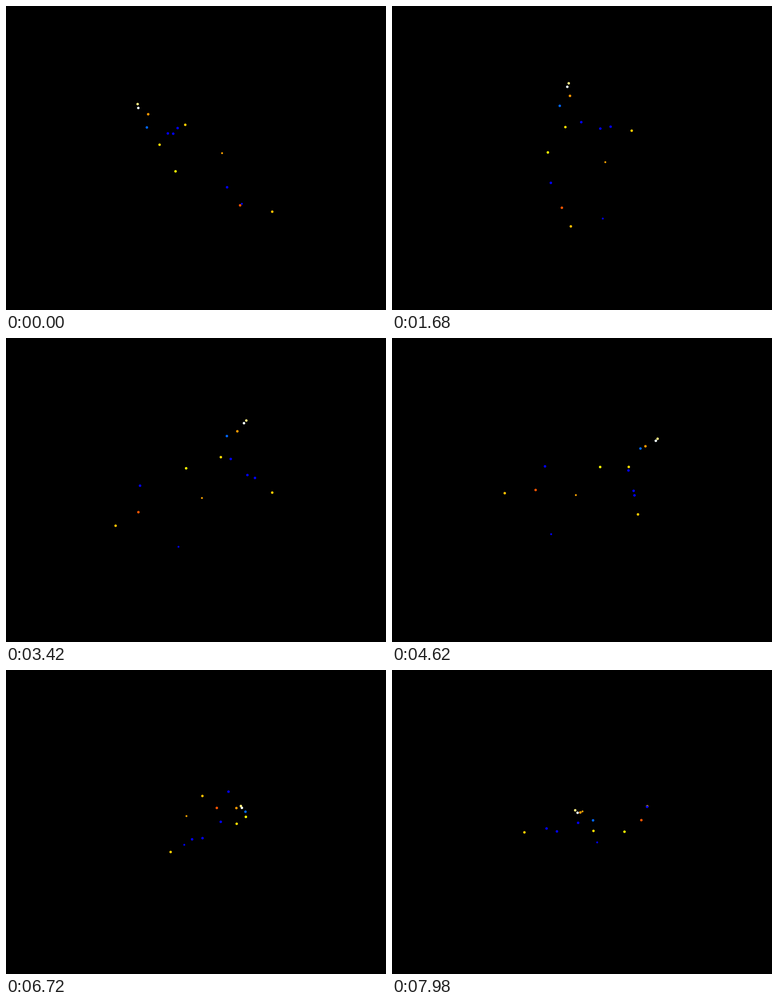
A matplotlib script that plays this animation: 837x669 px, repeating every 8000 ms.

```python
import numpy as np
import matplotlib.pyplot as plt
from matplotlib.animation import FuncAnimation

W, H, DPI = 837, 669, 64
CX, CY = 435.7, 331          # screen position of the rotation axis
DEPTH = 2500                 # camera distance in pixels
ELEV = np.radians(30)
BIG, SMALL = 5.6, 4.2        # dot diameters in pixels
BLUE = "#0000ff"

# x, depth, projected height, colour, diameter
STARS = [
    (-144.6, -40.0, 94.2, "#fff080", BIG),
    (-143.1, -35.1, 88.2, "#f2ffff", BIG),
    (-121.5, -28.1, 78.0, "#ff9900", BIG),
    (-123.7, -1.9, 61.9, "#0066ff", BIG),
    (-96.8, 1.0, 26.05, "#ffdd00", BIG),
    (-60.7, 70.8, 3.4, "#ffff00", BIG),
    (-79.4, -30.4, 35.5, BLUE, BIG),
    (-68.9, -75.3, 13.5, BLUE, BIG),
    (-59.4, -97.1, 15.7, BLUE, BIG),
    (-42.9, -144.7, 0.65, "#ffcc00", BIG),
    (40.4, -13.55, 0.4, "#ffa500", SMALL),
    (48.9, 132.4, 1.4, BLUE, BIG),
    (77.3, 123.7, -42.25, "#ff5500", BIG),
    (85.0, 23.1, -94.1, BLUE, SMALL),
    (144.7, 145.0, -44.3, "#ffbf00", BIG),
]
px, py, pz = np.array([s[:3] for s in STARS]).T
pz = pz / np.cos(ELEV)
colors = np.array([s[3] for s in STARS])
sizes = (np.array([s[4] for s in STARS]) * 72 / DPI) ** 2


def project(deg):
    """Screen positions and depths after turning the stars by deg."""
    a = np.radians(deg)
    u = px * np.cos(a) - py * np.sin(a)
    h = px * np.sin(a) + py * np.cos(a)
    d = h * np.cos(ELEV) + pz * np.sin(ELEV)
    v = pz * np.cos(ELEV) - h * np.sin(ELEV)
    scale = 1 / (1 - d / DEPTH)
    return np.column_stack([CX + u * scale, CY - v * scale]), d


fig = plt.figure(figsize=(W / DPI, H / DPI), dpi=DPI, facecolor="black")
ax = fig.add_axes([0, 0, 1, 1])
ax.set_xlim(0, W)
ax.set_ylim(H, 0)
ax.axis("off")
dots = ax.scatter(px, py, s=sizes, c=colors, linewidths=0)


def update(i):
    # one degree per 30 ms step, shown on a 20 ms clock
    pos, depth = project((2 * i + 1) // 3)
    order = np.argsort(depth)
    dots.set_offsets(pos[order])
    dots.set_facecolors(colors[order])
    dots.set_sizes(sizes[order], dpi=DPI)
    return dots,


anim = FuncAnimation(fig, update, frames=400, interval=20, repeat=True,
                     repeat_delay=0)
plt.show()
```
